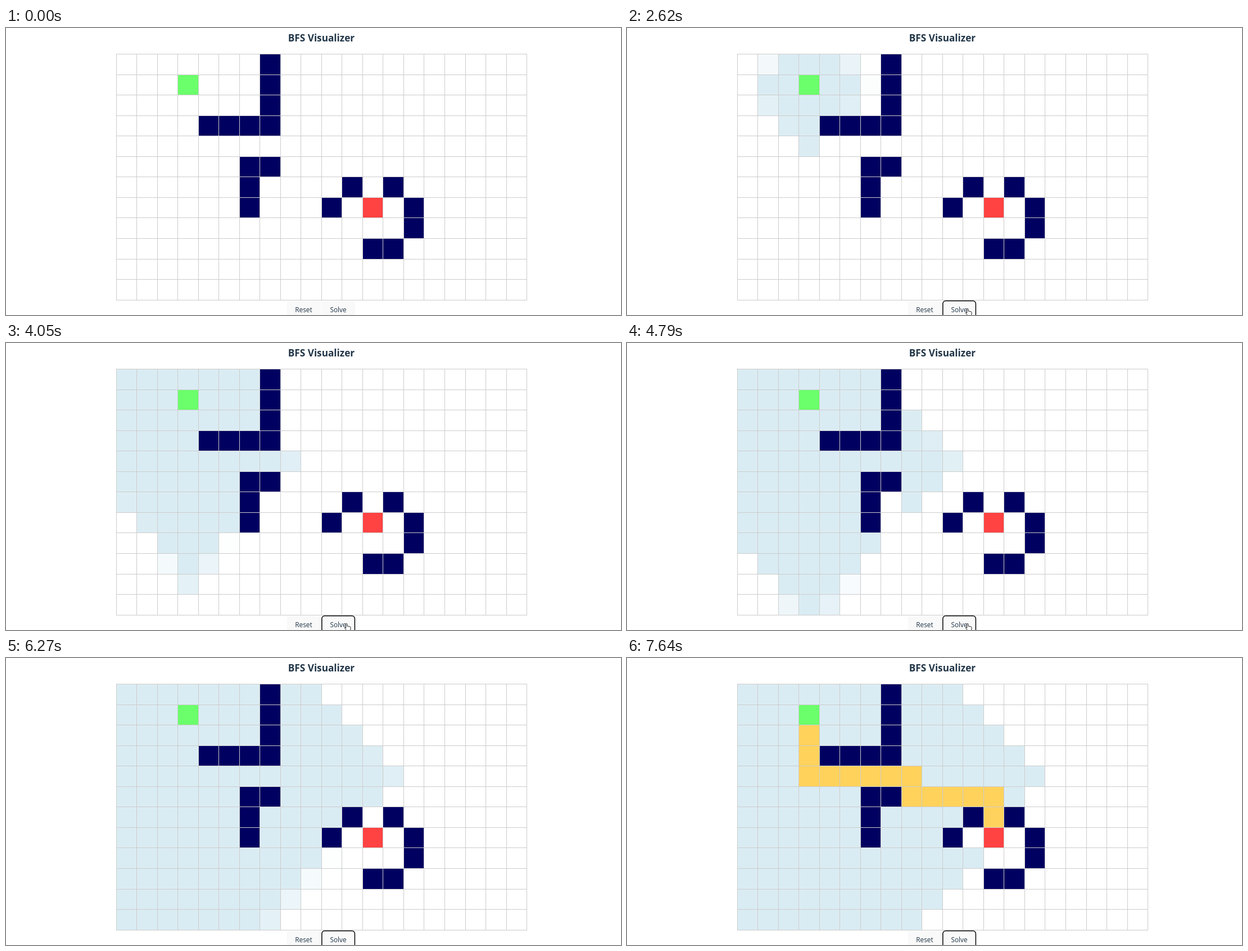
An HTML page for the animation above (8 s loop, 1094 by 512 pixels).

```html
<!DOCTYPE html>
<html lang="en">
<head>
<meta charset="utf-8">
<title>BFS Visualizer</title>
<style>
  html, body { margin: 0; width: 100%; height: 100%; overflow: hidden; background: #fff; }
  svg { display: block; width: 1094px; height: 512px; }
  text { font-family: "Open Sans", "Noto Sans", sans-serif; fill: #213547; text-anchor: middle; }
  .title { font-size: 17.2px; font-weight: 700; }
  .label { font-size: 11.8px; font-weight: 500; }
</style>
</head>
<body>
<svg id="stage" viewBox="0 0 1094 512">
  <text class="title" x="561" y="24">BFS Visualizer</text>
  <g id="cells"></g>
  <path id="lines" fill="none" stroke="#ccc"></path>
  <rect x="499.5" y="486.5" width="60.5" height="34" rx="5" fill="#f9f9f9"></rect>
  <rect x="561" y="486.5" width="60" height="34" rx="5" fill="#f9f9f9"></rect>
  <text class="label" x="529.5" y="507">Reset</text>
  <text class="label" x="591" y="507">Solve</text>
  <rect id="hover" x="561.5" y="486.8" width="59" height="34" rx="5" fill="none" stroke="#646cff" stroke-width=".7"></rect>
  <rect id="focus" x="561.8" y="486.8" width="58.6" height="34" rx="5" fill="none" stroke="#101010" stroke-width="1.6"></rect>
  <circle id="halo" r="10" fill="#fff21a" fill-opacity=".75"></circle>
  <g id="cursor" fill="#fff" stroke="#111" stroke-width=".9" stroke-linejoin="round">
    <path id="arrow" d="M0 0V11.5L2.7 9L4.6 13L6.3 12.2L4.5 8.4H8Z"></path>
    <path id="hand" d="M-2.4 1.2Q-2.6 -.6 -1.3 -.6T0 1V4.2Q1 3.4 2 4.6Q3 3.9 4 5Q5.8 4.6 6 6.4V9L5 12H-.8L-4.6 7.6Q-4.4 6 -2.2 7.4Z"></path>
  </g>
</svg>
<script>
const COLS = 20, ROWS = 12, LOOP = 8000, FADE = 300;
const START = [3, 1], GOAL = [12, 7];
const WALLS = [[7, 0], [7, 1], [7, 2], [7, 3], [4, 3], [5, 3], [6, 3], [6, 5], [7, 5], [6, 6],
  [6, 7], [11, 6], [13, 6], [10, 7], [14, 7], [14, 8], [12, 9], [13, 9]];
const DIRS = [[0, 1], [0, -1], [1, 0], [-1, 0]];
const WHITE = [255, 255, 255], SEEN = [218, 236, 243], ROUTE = [255, 210, 92];
const SEEN_AT = 1949, SEEN_STEP = 35.85, ROUTE_AT = 6733, ROUTE_STEP = 50;
const CLICK = 1880, HALO_END = 1950, HOVER = 890, LEAVE = 5330, GONE = 5650;
// time, x, y of the pointer tip
const TRACK = [[60, 894, 516], [220, 850, 496], [400, 770, 481], [600, 690, 477], [850, 624, 483],
  [1000, 615, 494], [1270, 607, 501], [LEAVE, 607, 501], [GONE, 616, 522]];

const $ = id => document.getElementById(id);
const key = ([c, r]) => r * COLS + c;
const lineX = c => Math.floor(196 + 36.53 * c);
const lineY = r => Math.floor(46.5 + 36.55 * r);
const walls = new Set(WALLS.map(key));

function search() {
  const from = new Map([[key(START), null]]), queue = [START];
  for (const cell of queue) {
    for (const [dc, dr] of DIRS) {
      const next = [cell[0] + dc, cell[1] + dr], k = key(next);
      const inside = next[0] >= 0 && next[0] < COLS && next[1] >= 0 && next[1] < ROWS;
      if (!inside || walls.has(k) || from.has(k)) continue;
      from.set(k, cell);
      if (k === key(GOAL)) return { seen: queue.slice(1), route: trace(from) };
      queue.push(next);
    }
  }
}

function trace(from) {
  const route = [];
  for (let c = from.get(key(GOAL)); key(c) !== key(START); c = from.get(key(c))) route.unshift(c);
  return route;
}

function addCell([c, r], fill) {
  const box = document.createElementNS("http://www.w3.org/2000/svg", "rect");
  const x = lineX(c), y = lineY(r);
  const attrs = { x, y, width: lineX(c + 1) - x, height: lineY(r + 1) - y, fill };
  for (const name in attrs) box.setAttribute(name, attrs[name]);
  $("cells").append(box);
  return box;
}

// cubic-bezier(.25, .1, .25, 1)
function ease(x) {
  if (x <= 0) return 0;
  if (x >= 1) return 1;
  const curve = (a, b, s) => 3 * a * s * (1 - s) ** 2 + 3 * b * s * s * (1 - s) + s ** 3;
  let lo = 0, hi = 1;
  for (let i = 0; i < 18; i++) {
    const mid = (lo + hi) / 2;
    if (curve(.25, .25, mid) < x) lo = mid; else hi = mid;
  }
  return curve(.1, 1, lo);
}

const mix = (a, b, p) => a.map((v, i) => v + (b[i] - v) * p);
const show = (id, on) => $(id).setAttribute("visibility", on ? "visible" : "hidden");

function pointer(t) {
  let i = 0;
  while (i < TRACK.length - 2 && t > TRACK[i + 1][0]) i++;
  const [t0, ...a] = TRACK[i], [t1, ...b] = TRACK[i + 1];
  return mix(a, b, Math.min(1, Math.max(0, (t - t0) / (t1 - t0))));
}

const { seen, route } = search();
const routeAt = new Map(route.map((cell, i) => [key(cell), ROUTE_AT + i * ROUTE_STEP]));
const tiles = seen.map((cell, i) => ({
  box: addCell(cell, "#fff"),
  seenAt: SEEN_AT + (i + 1) * SEEN_STEP,
  routeAt: routeAt.get(key(cell)) ?? Infinity
}));
WALLS.forEach(cell => addCell(cell, "#000060"));
addCell(START, "#6bff6b");
addCell(GOAL, "#ff4242");

let d = "";
for (let c = 0; c <= COLS; c++) d += `M${lineX(c) + .5} ${lineY(0)}V${lineY(ROWS) + 1}`;
for (let r = 0; r <= ROWS; r++) d += `M${lineX(0)} ${lineY(r) + .5}H${lineX(COLS) + 1}`;
$("lines").setAttribute("d", d);

function draw(t) {
  for (const tile of tiles) {
    const base = mix(WHITE, SEEN, ease((t - tile.seenAt) / FADE));
    const color = mix(base, ROUTE, ease((t - tile.routeAt) / FADE));
    tile.box.setAttribute("fill", `rgb(${color.map(Math.round)})`);
  }
  const [x, y] = pointer(t), over = t >= HOVER && t < GONE;
  $("cursor").setAttribute("transform", `translate(${x} ${y})`);
  $("halo").setAttribute("cx", x);
  $("halo").setAttribute("cy", y);
  show("cursor", t > 60 && t < GONE);
  show("arrow", t > 60 && t < HOVER);
  show("hand", over);
  show("hover", over && t < CLICK);
  show("focus", t >= CLICK);
  show("halo", t >= CLICK && t < HALO_END);
}

function tick() {
  draw(performance.now() % LOOP);
  requestAnimationFrame(tick);
}
tick();
</script>
</body>
</html>
```
